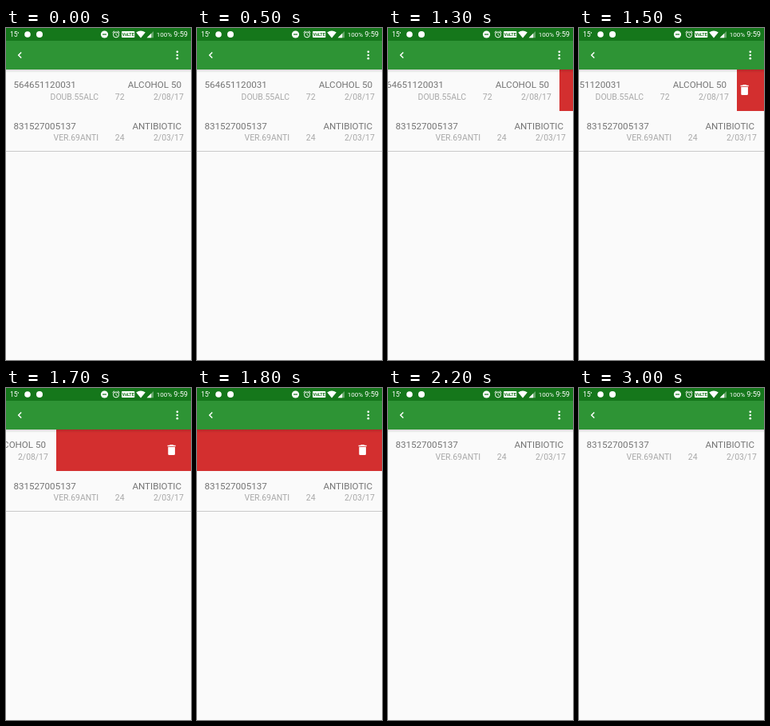
An HTML page with a canvas that plays this animation: 232 by 416 pixels, repeating every 5.1 s.

```html
<!DOCTYPE html>
<html lang="en">
<head>
<meta charset="utf-8">
<title>Swipe to delete</title>
<style>
html, body { margin: 0; width: 100%; height: 100%; overflow: hidden; background: #fafafa; }
canvas { display: block; width: 232px; height: 416px; }
</style>
</head>
<body>
<canvas id="stage"></canvas>
<script>
const W = 232, H = 416, LOOP = 5100, STEP = 100;
const TOP = 52, ROW = 51.4;
const PAPER = '#fafafa', STATUS = '#15771b', BAR = '#2e9435', RED = '#d32f2f';
const FONT = 'Roboto, Arial, sans-serif';

const rows = [
  { code: '564651120031', name: 'ALCOHOL 50', lot: 'DOUB.55ALC', count: '72', date: '2/08/17' },
  { code: '831527005137', name: 'ANTIBIOTIC', lot: 'VER.69ANTI', count: '24', date: '2/03/17' }
];

// [time, value] pairs, joined linearly
const swipe = [[600, 0], [800, 1], [1000, 4], [1100, 7], [1200, 12], [1300, 18],
  [1400, 26], [1500, 35], [1600, 84], [1700, 170], [1800, 234]];
const lift = [[1900, 0], [2000, 0.12], [2100, 0.66], [2200, 1]];

const canvas = document.getElementById('stage');
const ctx = canvas.getContext('2d');
const dpr = window.devicePixelRatio || 1;
canvas.width = W * dpr;
canvas.height = H * dpr;
ctx.scale(dpr, dpr);

const trash = new Path2D('M6 19c0 1.1.9 2 2 2h8c1.1 0 2-.9 2-2V7H6zM19 4h-3.5l-1-1h-5l-1 1H5v2h14z');

function valueAt(keys, t) {
  if (t <= keys[0][0]) return keys[0][1];
  for (let i = 1; i < keys.length; i++) {
    const [t0, a] = keys[i - 1], [t1, b] = keys[i];
    if (t <= t1) return a + (b - a) * (t - t0) / (t1 - t0);
  }
  return keys[keys.length - 1][1];
}

function rect(x, y, w, h, color) {
  ctx.fillStyle = color;
  ctx.fillRect(x, y, w, h);
}

function text(s, x, y, size, color, align = 'left', weight = 400) {
  ctx.font = `${weight} ${size}px ${FONT}`;
  ctx.fillStyle = color;
  ctx.textAlign = align;
  ctx.fillText(s, x, y);
}

function disc(x, y, r, color = '#fff') {
  ctx.fillStyle = color;
  ctx.beginPath();
  ctx.arc(x, y, r, 0, Math.PI * 2);
  ctx.fill();
}

function line(points, width, color = '#fff') {
  ctx.strokeStyle = color;
  ctx.lineWidth = width;
  ctx.beginPath();
  points.forEach(([x, y]) => ctx.lineTo(x, y));
  ctx.stroke();
}

function polygon(points, color) {
  ctx.fillStyle = color;
  ctx.beginPath();
  points.forEach(([x, y]) => ctx.lineTo(x, y));
  ctx.fill();
}

function drawRow(row, x, y) {
  rect(x, Math.ceil(y), W + 1, Math.ceil(ROW), PAPER);
  text(row.code, x + 9.5, y + 23.2, 11.6, '#747474');
  text(row.name, x + 220, y + 23.2, 11.6, '#747474', 'right');
  text(row.lot, x + 116, y + 37.6, 10.4, '#a8a8a8', 'right');
  text(row.count, x + 148.5, y + 37.6, 10.4, '#a8a8a8', 'right');
  text(row.date, x + 222.8, y + 37.6, 10.4, '#a8a8a8', 'right');
}

function drawTrash() {
  ctx.save();
  ctx.translate(207.6, 77.6);
  ctx.scale(0.72, 0.72);
  ctx.translate(-12, -12);
  ctx.fillStyle = '#fff';
  ctx.fill(trash);
  ctx.restore();
}

function drawStatus() {
  rect(0, 0, W, 16, STATUS);
  text('15', 5, 11.2, 8.6, '#fff');
  rect(14.8, 5, 0.9, 2, '#fff');
  disc(27, 8, 3.8);
  disc(42, 8, 4);

  disc(123.5, 8, 4.6);
  rect(121, 7.4, 5, 1.2, STATUS);

  ctx.strokeStyle = '#fff';
  ctx.lineWidth = 1;
  ctx.beginPath();
  ctx.arc(138, 8.4, 3.5, 0, Math.PI * 2);
  ctx.stroke();
  line([[138, 6.4], [138, 8.7], [139.6, 9.6]], 0.8);
  line([[133.5, 5.8], [136, 3.8]], 1);
  line([[140, 3.8], [142.5, 5.8]], 1);

  ctx.fillStyle = '#fff';
  ctx.beginPath();
  ctx.roundRect(145, 4, 16.3, 8, 1);
  ctx.fill();
  text('VoLTE', 153.1, 10, 5.4, STATUS, 'center', 700);

  ctx.fillStyle = '#fff';
  ctx.beginPath();
  ctx.moveTo(169, 12.6);
  ctx.lineTo(163.2, 5.6);
  ctx.quadraticCurveTo(169, 1.6, 174.8, 5.6);
  ctx.fill();

  polygon([[176.6, 12.3], [185, 12.3], [185, 4]], 'rgba(255,255,255,.35)');
  polygon([[176.6, 12.3], [182.2, 12.3], [182.2, 6.8]], '#fff');
  text('100%', 208, 11.2, 8, '#fff', 'right');
  text('9:59', 228, 11.2, 9.2, '#fff', 'right');
}

function drawBar() {
  const shade = ctx.createLinearGradient(0, TOP, 0, TOP + 4);
  shade.addColorStop(0, 'rgba(0,0,0,.14)');
  shade.addColorStop(1, 'rgba(0,0,0,0)');
  rect(0, TOP, W, 4, shade);
  rect(0, 16, W, TOP - 16, BAR);
  line([[19.2, 30.5], [15.7, 34], [19.2, 37.5]], 1.5);
  for (const y of [29.8, 34, 38.2]) disc(214.8, y, 1.35);
}

function draw(t) {
  const shift = valueAt(swipe, t);
  const rise = valueAt(lift, t);
  const y = TOP + ROW * (1 - rise);

  rect(0, 0, W, H, PAPER);
  if (rise < 1) {
    if (shift > 0) {
      rect(0, TOP, W, Math.ceil(ROW), RED);
      drawTrash();
    }
    if (shift < W) drawRow(rows[0], -shift, TOP);
  }
  drawRow(rows[1], 0, y);
  if (rise < 1) rect(0, Math.floor(y + ROW), W, 1, '#cacaca');
  drawBar();
  drawStatus();
}

const start = performance.now();
function tick() {
  const t = (performance.now() - start) % LOOP;
  draw(Math.floor(t / STEP) * STEP);
  requestAnimationFrame(tick);
}
tick();
</script>
</body>
</html>
```
